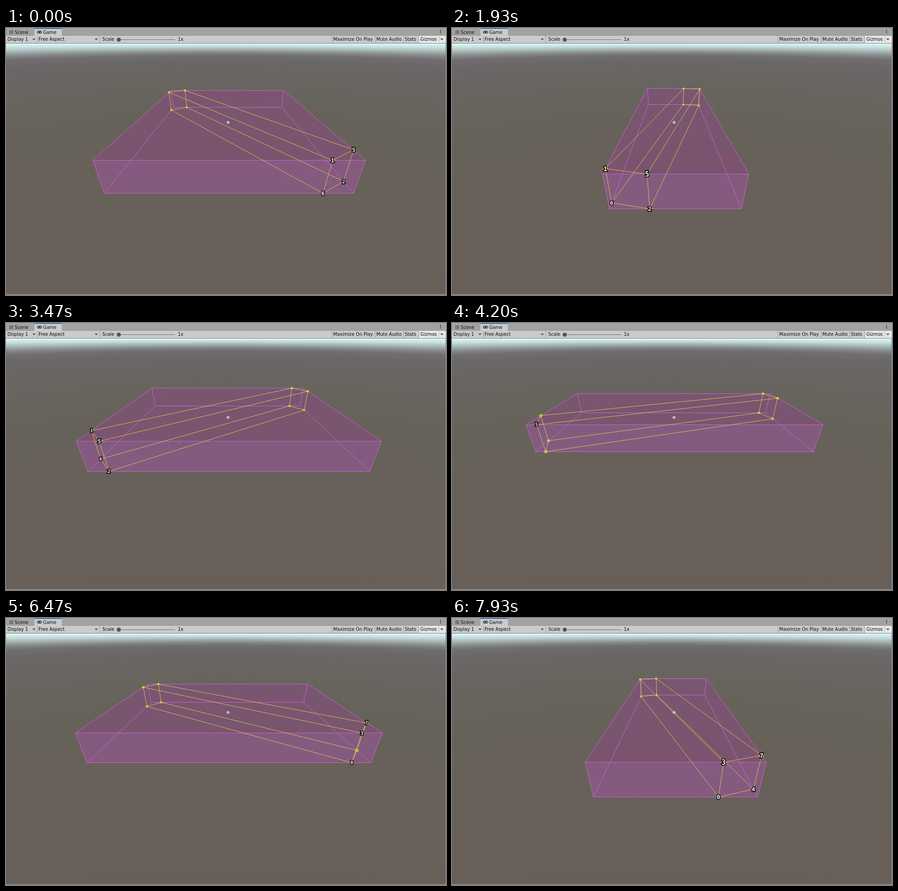
An HTML page with a canvas that plays this animation: 960x584 px, repeating every 8000 ms.

```html
<!DOCTYPE html>
<html lang="en">
<head>
<meta charset="utf-8">
<title>Rotating box bounds</title>
<style>
html, body { margin: 0; width: 100%; height: 100%; overflow: hidden; background: #685f59; }
canvas { display: block; width: 960px; height: 584px; }
</style>
</head>
<body>
<canvas id="stage" width="960" height="584"></canvas>
<script>
const W = 960, H = 584;
const stage = document.getElementById('stage').getContext('2d');
const UI_FONT = '9.75px "DejaVu Sans", sans-serif';

// Camera: 60 degree field of view, looking down on the pivot.
const FOCAL = 474.6, CX = 480, CY = 308;
const PITCH = 30.45 * Math.PI / 180, SIN = Math.sin(PITCH), COS = Math.cos(PITCH);
const PIVOT = { x: 0.075, y: -3, z: 9.063 };
const HALF = { length: 5.03, width: 0.499, height: 0.499 };
const START_ANGLE = 54.55, SPEED = 24.92, LOOP = 8000;
const SPHERE = 0.05, LABEL_RANGE = 7.25;

// Box corners by number: end of the long axis, side, height.
const CORNERS = [
  [-1, 1, -1], [1, -1, 1], [1, 1, -1], [-1, 1, 1],
  [-1, -1, -1], [1, 1, 1], [1, -1, -1], [-1, -1, 1]
];
const EDGES = [];
for (let i = 0; i < 8; i++)
  for (let j = i + 1; j < 8; j++)
    if (CORNERS[i].filter((v, k) => v !== CORNERS[j][k]).length === 1) EDGES.push([i, j]);

function project(x, y, z) {
  x += PIVOT.x; y += PIVOT.y; z += PIVOT.z;
  const depth = z * COS - y * SIN;
  return {
    x: Math.round(CX + FOCAL * x / depth) + 0.5,
    y: Math.round(CY - FOCAL * (y * COS + z * SIN) / depth) + 0.5,
    depth
  };
}

function rect(c, color, x, y, w, h) {
  c.fillStyle = color;
  c.fillRect(x, y, w, h);
}

function polygon(c, color, points) {
  c.fillStyle = color;
  c.beginPath();
  points.forEach(p => c.lineTo(p.x, p.y));
  c.fill();
}

// Sky colours follow the angle below the horizon, so the bands curve.
function drawSky(c) {
  const bands = [
    [0.006, '#dcf9f8'], [0.018, '#c2dbdb'], [0.03, '#9eaaaa'], [0.04, '#838584'],
    [0.05, '#706e70'], [0.07, '#6b6768'], [0.12, '#696562'], [0.21, '#67645d'],
    [0.3, '#66625a'], [0.45, '#68615a'], [0.87, '#685f59']
  ];
  for (let x = 0; x < W; x++) {
    const u = (x + 0.5 - CX) / FOCAL;
    const gradient = c.createLinearGradient(0, 34, 0, H);
    for (const [dip, color] of bands) {
      let v = -0.5;
      for (let k = 0; k < 12; k++) v = (dip * Math.hypot(1, u, v) - SIN) / COS;
      const at = (CY + FOCAL * v - 34) / (H - 34);
      gradient.addColorStop(Math.min(1, Math.max(0, at)), color);
    }
    rect(c, gradient, x, 34, 1, H - 34);
  }
}

function drawToolbar(c) {
  rect(c, '#a2a2a2', 0, 0, W, 17);
  rect(c, '#cbcbcb', 0, 17, W, 16);
  rect(c, '#999999', 0, 16, W, 1);
  rect(c, '#808080', 0, 33, W, 1);
  rect(c, '#cbcbcb', 62, 0, 60, 17);
  rect(c, '#3a72b0', 62, 0, 60, 2);
  rect(c, '#e6e6e6', 901, 17, 58, 16);
  for (const x of [68, 204, 711, 805, 867, 900]) rect(c, '#999999', x, 17, 1, 16);
  rect(c, '#b0b0b0', 944, 19, 1, 12);

  c.font = UI_FONT;
  c.fillStyle = '#0c0c0c';
  const labels = [
    ['Scene', 19, 13], ['Game', 81, 13], ['Display 1', 3, 28], ['Free Aspect', 71, 28],
    ['Scale', 210, 28], ['1x', 375, 28], ['Maximize On Play', 714, 28],
    ['Mute Audio', 808, 28], ['Stats', 870, 28], ['Gizmos', 904, 28]
  ];
  for (const [text, x, y] of labels) c.fillText(text, x, y);
  for (const x of [61, 197, 951])
    polygon(c, '#555555', [{ x: x - 3.5, y: 23 }, { x: x + 3.5, y: 23 }, { x, y: 27 }]);

  rect(c, '#686868', 246, 25, 123, 1);
  c.fillStyle = '#555555';
  c.beginPath();
  c.arc(246, 25.5, 4.5, 0, 7);
  c.fill();

  for (const k of [0, 3, 6]) {
    rect(c, '#555555', 8 + k, 5, 1, 8);
    rect(c, '#555555', 7, 6 + k, 9, 1);
    rect(c, '#444444', 947, 4 + k, 2, 2);
  }

  c.fillStyle = '#444444';
  c.beginPath();
  c.roundRect(67.5, 6, 11, 6, 3);
  c.fill();
  rect(c, '#cbcbcb', 69, 8.5, 3, 1);
  rect(c, '#cbcbcb', 70, 7.5, 1, 3);
  rect(c, '#cbcbcb', 75, 8, 2, 2);

  rect(c, '#8a8a8a', 0, 582, W, 2);
  rect(c, '#8a8a8a', 959, 34, 1, 550);
}

const backdrop = document.createElement('canvas');
backdrop.width = W;
backdrop.height = H;
drawSky(backdrop.getContext('2d'));
drawToolbar(backdrop.getContext('2d'));

function wire(points, color) {
  stage.strokeStyle = color;
  stage.lineWidth = 1;
  stage.beginPath();
  for (const [i, j] of EDGES) {
    stage.moveTo(points[i].x, points[i].y);
    stage.lineTo(points[j].x, points[j].y);
  }
  stage.stroke();
}

function sphere(p, color) {
  const r = FOCAL * SPHERE / p.depth;
  stage.strokeStyle = color;
  stage.lineWidth = 1;
  stage.beginPath();
  stage.arc(p.x, p.y, r, 0, 7);
  stage.moveTo(p.x + r, p.y);
  stage.ellipse(p.x, p.y, r, r * SIN, 0, 0, 7);
  stage.stroke();
}

function label(p, text) {
  stage.font = `bold ${Math.round(70 / p.depth)}px "DejaVu Sans Mono", monospace`;
  stage.textAlign = 'center';
  stage.lineJoin = 'miter';
  stage.miterLimit = 2;
  stage.lineWidth = 3.4;
  stage.strokeStyle = '#000';
  stage.fillStyle = '#fff';
  const y = p.y + 25.5 / p.depth;
  stage.strokeText(text, p.x, y);
  stage.fillText(text, p.x, y);
}

function draw(time) {
  const angle = -(START_ANGLE + SPEED * time / 1000) * Math.PI / 180;
  const dx = Math.cos(angle), dz = Math.sin(angle);
  const { length, width, height } = HALF;
  const boundX = length * Math.abs(dx) + width * Math.abs(dz);
  const boundZ = length * Math.abs(dz) + width * Math.abs(dx);
  const bounds = CORNERS.map(([x, z, y]) => project(x * boundX, y * height, z * boundZ));
  const box = CORNERS.map(([end, side, up]) => project(
    end * length * dx - side * width * dz,
    up * height,
    end * length * dz + side * width * dx
  ));

  stage.drawImage(backdrop, 0, 0);
  const face = (color, ids) => polygon(stage, color, ids.map(i => bounds[i]));
  face('rgba(139,73,132,.5)', [3, 5, 1, 7]);
  face('rgba(160,84,163,.5)', [7, 1, 6, 4]);
  wire(bounds, 'rgba(218,104,218,.85)');
  wire(box, 'rgba(232,214,76,.85)');
  box.forEach(p => sphere(p, '#ece636'));
  sphere(project(0, 0, 0), '#f4eef2');

  box.map((p, i) => ({ p, i }))
    .filter(({ p }) => p.depth < LABEL_RANGE)
    .sort((a, b) => b.p.depth - a.p.depth)
    .forEach(({ p, i }) => label(p, String(i)));
}

// Fifteen poses per second, each starting on a whole 10 ms.
function poseTime(t) {
  const part = t % 200;
  const step = part < 70 ? 0 : part < 130 ? 1 : 2;
  return t - part + step * 200 / 3;
}

const start = performance.now();
function tick() {
  draw(poseTime((performance.now() - start) % LOOP));
  requestAnimationFrame(tick);
}
tick();
</script>
</body>
</html>
```
